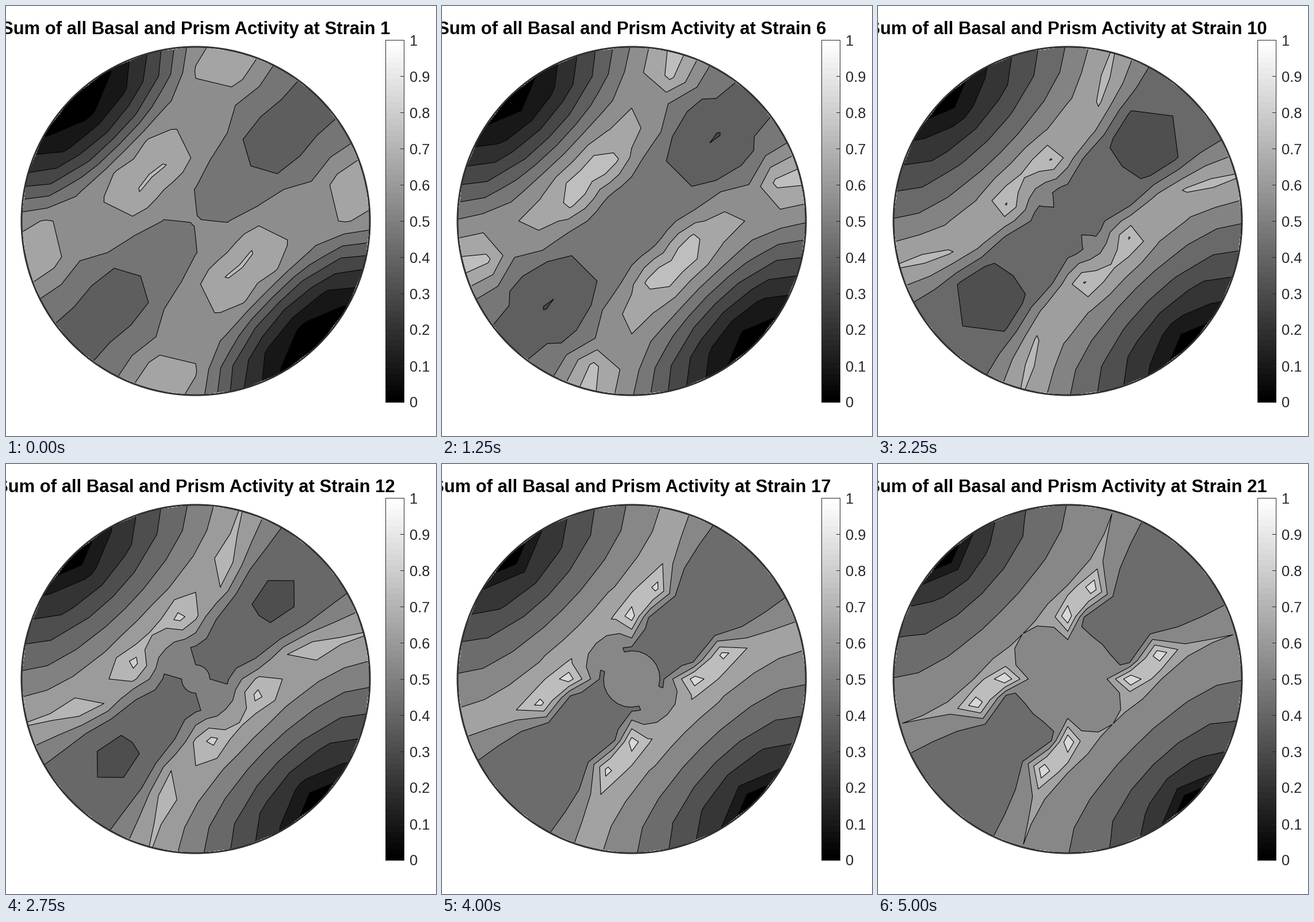
These frames come from a looping animation (748x748 px, 5.25 s). A matplotlib script:

```python
import numpy as np
import matplotlib.pyplot as plt
from matplotlib.animation import FuncAnimation
from matplotlib.patches import Circle, Rectangle

SIZE, DPI = 748, 100
CX, CY, RADIUS = 330, 374, 303
STRAINS = 21
INK = "#262626"
SANS = "Liberation Sans"

# Equal-area polar grid, 15 degrees in both directions.
tilt = np.arange(0, 91, 15)[:, None]
turn = np.radians(np.arange(0, 361, 15))
ring = RADIUS * np.sqrt(2) * np.sin(np.radians(tilt / 2))
X = CX + ring * np.cos(turn)
Y = CY - ring * np.sin(turn)

# Direction cosines towards the loading axis (135 degrees) and the centre.
axial = np.abs(np.sin(np.radians(tilt)) * np.cos(turn - np.radians(135)))
upright = np.cos(np.radians(tilt))


def bell(v, mid, width):
    return np.exp(-(((v - mid) / width) ** 2))


def smoothstep(v, lo, hi):
    p = np.clip((v - lo) / (hi - lo), 0, 1)
    return p * p * (3 - 2 * p)


KEYS = [1, 4, 10, 14, 21]


def track(strain, *values):
    return np.interp(strain, KEYS, values)


def activity(strain):
    def at(*values):
        return track(strain, *values)

    # Valley across the loading axis, raised at the centre.
    valley = at(0.405, 0.44, 0.42, 0.43, 0.47)
    valley = valley + at(0.15, 0.09, 0.075, 0.1, 0.085) * upright ** 4
    hollow = bell(tilt, 52, 13) * bell(axial, 0, 0.25)
    valley = valley - at(0.02, 0.1, 0.11, 0.03, 0) * hollow

    # Plateau that drops to zero at the loading axis.
    scale = at(1.98, 1.54, 0.97, 1, 0.79)
    power = at(0.95, 0.81, 0.5, 0.48, 0.32)
    slope = scale * np.maximum(1 - axial, 0) ** power
    plateau = np.minimum(slope, at(0.65, 0.63, 0.69, 0.74, 0.72))
    rise = smoothstep(axial, at(0.1, 0.15, 0.2, 0.2, 0.25),
                      at(0.48, 0.46, 0.4, 0.36, 0.36))

    # Sharp ridge that narrows in on the valley, rippling towards the rim.
    crest = at(0.5, 0.49, 0.445, 0.38, 0.36)
    ridge = at(0, 0.06, 0.1, 0.15, 0.25) * bell(axial, crest, 0.04)
    wave = np.cos(2 * np.pi * (tilt - 30) / 55) * bell(axial, crest, 0.1)
    ripple = at(0.095, 0.15, 0.05, 0.03, 0.02) * wave
    return valley + (plateau - valley) * rise + ridge + ripple


def level_step(strain):
    return np.interp(strain, [1, 4, 6, 10, 14, 17],
                     [0.092, 0.1, 0.093, 0.103, 0.1, 0.106])


fig = plt.figure(figsize=(SIZE / DPI, SIZE / DPI), dpi=DPI, facecolor="white")
ax = fig.add_axes([0, 0, 1, 1])
ax.axis("off")


def px(n):
    """Pixels to points."""
    return n * 72 / DPI


def draw_colorbar(left=660.5, right=692.5, top=59, bottom=689):
    shades = np.linspace(1, 0, 64)[:, None]
    ax.imshow(shades, cmap="gray", vmin=0, vmax=1, aspect="auto",
              interpolation="nearest", extent=(left, right, bottom, top))
    ax.add_patch(Rectangle((left, top), right - left, bottom - top,
                           fill=False, ec=INK, lw=px(1)))
    for i in range(11):
        y = bottom + (top - bottom) * i / 10
        ax.plot([right - 6, right], [y, y], color=INK, lw=px(1))
        ax.text(702, y + 9.5, f"{i / 10:g}", color=INK, family=SANS,
                size=px(25.5), va="baseline")


draw_colorbar()
ax.set_xlim(0, SIZE)
ax.set_ylim(SIZE, 0)
ax.set_autoscale_on(False)
ax.add_patch(Circle((CX, CY), RADIUS, fill=False, ec="#303030",
                    lw=px(3), zorder=5))
title = ax.text(CX, 49, "", family=SANS, weight="bold", size=px(31),
                color="black", ha="center", va="baseline")
layers = []


def update(i):
    strain = i + 1
    while layers:
        layers.pop().remove()
    step = level_step(strain)
    z = activity(strain) / step
    grays = [str(step * k) for k in range(9)]
    layers.append(ax.contourf(X, Y, z, levels=[-1, *range(1, 9), 11],
                              colors=grays, zorder=2))
    layers.append(ax.contour(X, Y, z, levels=range(1, 9), colors="black",
                             linewidths=px(1.1), zorder=3))
    title.set_text(f"Sum of all Basal and Prism Activity at Strain {strain}")
    return []


anim = FuncAnimation(fig, update, frames=STRAINS, interval=250,
                     init_func=lambda: [], repeat=True, repeat_delay=0)
plt.show()
```
